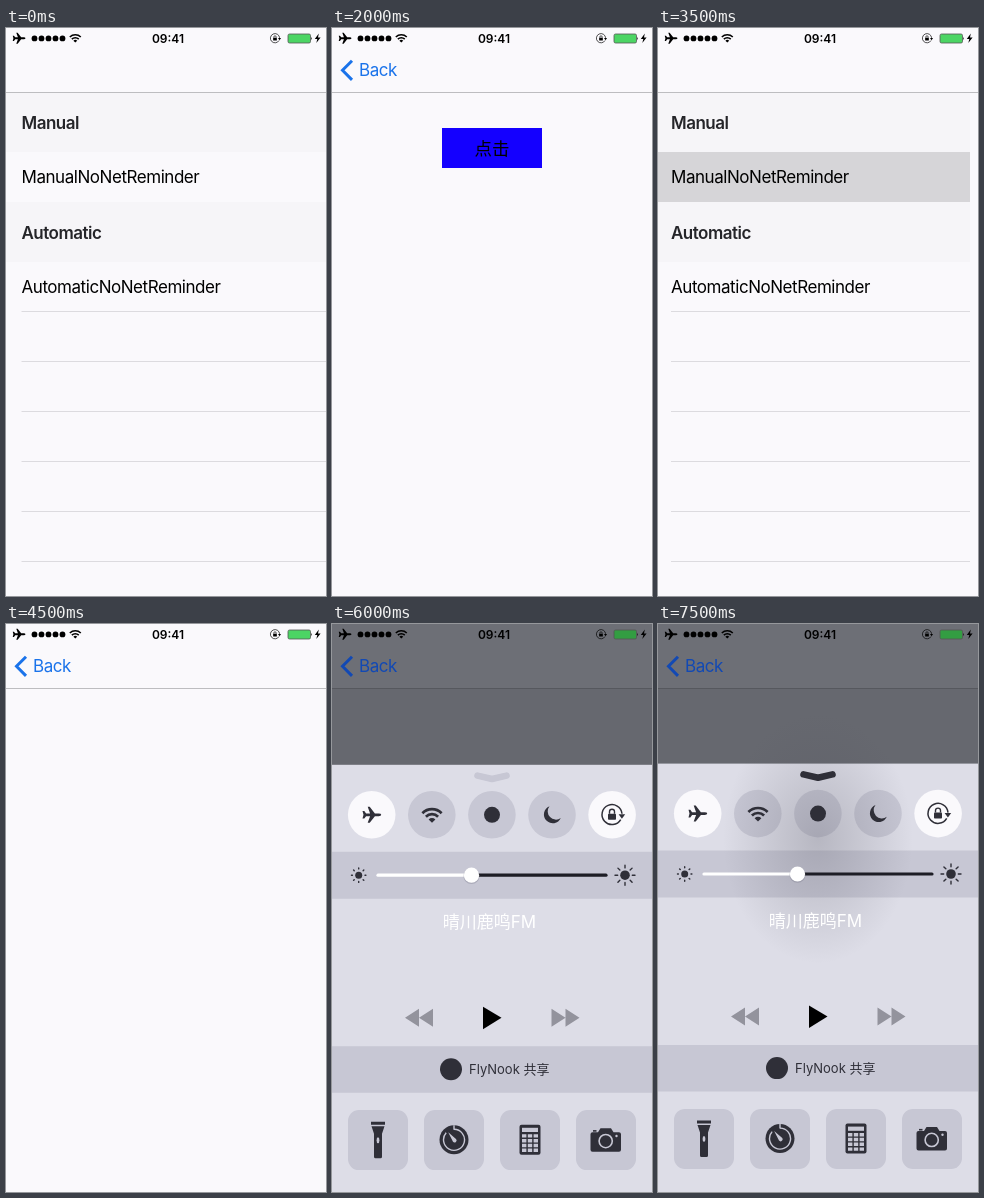
Recreate the animation shown at these times as an HTML page. Size 320x568 px, loop 8000 ms.

```html
<!DOCTYPE html>
<html lang="zh-CN">
<head>
<meta charset="utf-8">
<title>No-network reminder</title>
<style>
html, body { margin: 0; width: 100%; height: 100%; overflow: hidden; background: #faf9fc; }
svg { display: block; width: 320px; height: 568px; font: 17px Inter, "Noto Sans CJK SC", "Noto Sans CJK", sans-serif;
  --page: #faf9fc; --nav: #faf9fc; --blue: #1a73ea; --line: #bdbdc0; --bat: #4cd564; }
svg.soft { --page: #e8e7ea; --nav: #ebebed; --line: #adadb0; --blue: #156be0; --bat: #45c45b; }
svg.dim { --page: #66686f; --nav: #6d6f76; --blue: #1249b4; --line: #56585e; --bat: #339d42; }
.latin { letter-spacing: -.45px; }
.bold { font-weight: 600; fill: #252529; letter-spacing: -.5px; }
.mid { text-anchor: middle; }
.tint { fill: #c7c7d4; }
.ink { fill: #2f2f38; }
.pen { fill: none; stroke: #2f2f38; }
</style>
</head>
<body>
<svg id="stage" viewBox="0 0 320 568">
  <defs>
    <path id="plane" d="M9.5 0Q9.5-1.4 7-1.4H3.2L-2-8H-4L-1.6-1.4H-5.6L-7.4-3.8H-9.2L-8.2 0L-9.2 3.8H-7.4L-5.6 1.4H-1.6L-4 8H-2L3.2 1.4H7Q9.5 1.4 9.5 0Z"/>
    <g id="wifi">
      <path id="wifiArcs" fill="none" stroke="currentColor" stroke-width="2.7"/>
      <path id="wifiDot" fill="currentColor"/>
    </g>
    <path id="wifiOutline" fill="none" stroke="currentColor" stroke-width="4.2" stroke-linejoin="round"/>
    <g id="lock">
      <path d="M8.7 4.8A10 10 0 1 1 10-1" fill="none" stroke="currentColor" stroke-width="1.5"/>
      <path d="M6.6-.6H13.2L9.9 4Z" fill="currentColor"/>
      <rect x="-4" y="-1" width="8" height="6" rx=".8" fill="currentColor"/>
      <path d="M-2.5-1V-3A2.5 2.5 0 0 1 2.5-3V-1" fill="none" stroke="currentColor" stroke-width="1.4"/>
    </g>
    <radialGradient id="blur">
      <stop offset="0" stop-color="#50505c" stop-opacity=".27"/>
      <stop offset=".45" stop-color="#50505c" stop-opacity=".15"/>
      <stop offset="1" stop-color="#50505c" stop-opacity="0"/>
    </radialGradient>
  </defs>

  <rect width="320" height="568" fill="var(--page)"/>
  <rect width="320" height="64" fill="var(--nav)"/>

  <g id="list">
    <g id="rows">
      <path d="M-10 65H330V124H-10ZM-10 174H330V234H-10Z" fill="#f6f5f8"/>
      <rect id="highlight" x="-10" y="124" width="340" height="50" fill="#d6d5d8"/>
      <text class="bold" x="15.5" y="101">Manual</text>
      <text class="latin" x="15.5" y="155">ManualNoNetReminder</text>
      <text class="bold" x="15.5" y="211">Automatic</text>
      <text class="latin" x="15.5" y="265">AutomaticNoNetReminder</text>
      <path id="separators" stroke="#dcdbdf"/>
    </g>
    <rect id="leaving" x="312" y="65" width="8" height="503" fill="#faf9fc"/>
  </g>

  <path d="M0 64.5H320" stroke="var(--line)"/>

  <g id="back" fill="var(--blue)">
    <path d="M20 32.7L10.5 42.3L20 51.9" fill="none" stroke="var(--blue)" stroke-width="3"/>
    <text class="latin" x="27" y="48">Back</text>
  </g>

  <g id="button">
    <rect x="110" y="100" width="100" height="40" fill="#1400ff"/>
    <text class="mid" x="160" y="126.5" font-size="17.5">点击</text>
  </g>

  <g id="hud">
    <rect x="85" y="229" width="150" height="110" rx="10" fill="#000" opacity=".8"/>
    <use href="#wifiOutline" transform="translate(160 294) scale(.55)" color="#fff"/>
    <text class="mid" x="160" y="321" font-size="16" fill="#fff">请检查您的网络</text>
  </g>

  <g id="empty">
    <use href="#wifiOutline" x="159.5" y="255"/>
    <text class="mid" x="160" y="290">请检查您的网络</text>
  </g>

  <g id="status">
    <use href="#plane" transform="translate(13 10.3) scale(.68)"/>
    <g id="dots"></g>
    <use href="#wifi" transform="translate(69.3 10) scale(.57)"/>
    <text class="mid" x="162" y="14.6" font-size="12" font-weight="600">09:41</text>
    <use href="#lock" transform="translate(269 10.3) scale(.46)"/>
    <rect x="282" y="6" width="22.5" height="9" rx="1.5" fill="var(--bat)" stroke="#555" stroke-width=".8"/>
    <path d="M305.3 8.7Q306.8 10.5 305.3 12.3Z"/>
    <path d="M312.8 5.5L308.8 11H311.3L310.3 15L314.6 9.4H312Z"/>
  </g>

  <g id="panel">
    <rect width="320" height="580" fill="#dddde7"/>
    <g id="toggles"></g>
    <path class="tint" d="M0 87H320V134H0ZM0 281.5H320V328H0Z"/>
    <ellipse id="smudge" cx="160" cy="75" rx="95" ry="125" fill="url(#blur)"/>
    <path id="grabber" fill="none" stroke-width="6.6" stroke-linecap="round" stroke-linejoin="round"/>

    <use href="#plane" class="ink" x="39.7" y="50"/>
    <use href="#wifi" x="100" y="50" color="#2f2f38"/>
    <circle class="ink" cx="160" cy="50" r="8"/>
    <path class="ink" d="M217.5 41.5A8.8 8.8 0 1 0 228.8 53.2A8.2 8.2 0 0 1 217.5 41.5Z"/>
    <use href="#lock" x="280" y="50" color="#2f2f38"/>

    <g id="suns"></g>
    <path d="M46 110.4H139" stroke="#fff" stroke-width="3.2" stroke-linecap="round"/>
    <path d="M139 110.4H274" stroke="#1d1d25" stroke-width="3.2" stroke-linecap="round"/>
    <circle cx="139.5" cy="111.2" r="8" fill="#77778a" opacity=".35"/>
    <circle cx="139.5" cy="110.4" r="7.6" fill="#fff"/>

    <text class="mid" x="157.5" y="163" fill="#fff">晴川鹿鸣FM</text>

    <path d="M87 244V262L73 253ZM101 244V262L87 253ZM219.5 244V262L233.5 253ZM233.5 244V262L247.5 253Z" fill="#93939d"/>
    <path d="M151 242L169.5 253L151 264.5Z"/>
    <circle class="ink" cx="119" cy="304.5" r="11"/>
    <text x="137" y="309.3" font-size="13" class="ink">FlyNook 共享</text>

    <g id="tiles" class="tint"></g>
    <g class="ink">
      <path d="M39 357H53V360H39ZM39.5 361.5H52.5L50 369V392Q50 393.5 48.5 393.5H43.5Q42 393.5 42 392V369Z"/>
      <ellipse cx="46" cy="375.5" rx="1.4" ry="3" fill="#c7c7d4"/>
      <circle cx="122" cy="375" r="14.5"/>
      <path d="M122 364.5A10.5 10.5 0 1 1 114.2 368" fill="none" stroke="#c7c7d4" stroke-width="1.4"/>
      <path d="M122 360.5V365" stroke="#c7c7d4" stroke-width="1.4"/>
      <path d="M116.2 367.5L124 374.2A2 2 0 0 1 121 377Z" fill="#c7c7d4"/>
      <rect x="187.5" y="360" width="21" height="30" rx="2"/>
      <rect x="190" y="363" width="16" height="4.2" fill="#c7c7d4"/>
      <path id="keys" fill="#c7c7d4"/>
      <path d="M260.5 367.5H266L268.5 363.5H279L281.5 367.5H287Q289 367.5 289 369.5V385Q289 387 287 387H260.5Q258.5 387 258.5 385V369.5Q258.5 367.5 260.5 367.5Z"/>
      <rect x="261" y="365.3" width="3.5" height="1.6"/>
      <circle cx="273.7" cy="376.3" r="6.6" fill="none" stroke="#c7c7d4" stroke-width="1.6"/>
      <circle cx="284.5" cy="371.2" r="1.2" fill="#c7c7d4"/>
    </g>
  </g>
</svg>
<script>
const $ = id => document.getElementById(id);
const set = (id, attr, value) => $(id).setAttribute(attr, value);
const show = (id, on) => { $(id).style.display = on ? '' : 'none'; };
const repeat = (n, fn) => Array.from({ length: n }, (_, i) => fn(i)).join('');

// Quarter arc of radius r above the apex (0, y)
const arc = (r, y, from = -1) => {
  const d = r * Math.SQRT1_2;
  return `${from * d} ${y - d}A${r} ${r} 0 0 ${from < 0 ? 1 : 0} ${-from * d} ${y - d}`;
};
const band = (outer, inner) => `M${arc(outer, 0)}L${arc(inner, 0, 1)}Z`;

set('wifiArcs', 'd', `M${arc(8.6, 8)}M${arc(13.6, 8)}`);
set('wifiDot', 'd', `M0 8L${arc(4.8, 8)}Z`);
set('wifiOutline', 'd', `${band(82, 67)}${band(54, 40)}M0 0L${arc(26, 0)}Z`);
set('separators', 'd', repeat(6, i => `M15.5 ${283.5 + 50 * i}H330`));
set('keys', 'd', repeat(12, i => `M${190 + 5.8 * (i % 3)} ${369.4 + 4.8 * (i / 3 | 0)}h4.4v3.4h-4.4z`));
$('dots').innerHTML = repeat(5, i => `<circle cx="${28.5 + 7 * i}" cy="10.4" r="2.9"/>`);
$('toggles').innerHTML = repeat(5, i => `<circle cx="${39.7 + 60.1 * i}" cy="50" r="23.8"/>`);
$('tiles').innerHTML = repeat(4, i => `<rect x="${16 + 76 * i}" y="345.3" width="60" height="60" rx="11"/>`);

const sun = (x, core, inner, outer) => `<circle class="ink" cx="${x}" cy="110.4" r="${core}"/>` +
  `<path class="pen" stroke-width="1.4" stroke-linecap="round" d="${repeat(8, i => {
    const c = Math.cos(i * Math.PI / 4), s = Math.sin(i * Math.PI / 4);
    return `M${x + inner * c} ${110.4 + inner * s}L${x + outer * c} ${110.4 + outer * s}`;
  })}"/>`;
$('suns').innerHTML = sun(26.7, 3.5, 6.3, 7.2) + sun(293, 4.8, 7.3, 10);

const FLAT = 'M145.5 12.5H174.5', CHEVRON = 'M145.5 10.8L160 14.2L174.5 10.8';
const list = { list: true }, page = {};
const open = { shade: 'dim', top: 139.6, grip: CHEVRON };

// One scene per half second
const STEP = 500;
const scenes = [
  list, list, list, { list: true, highlight: true },
  { button: true }, { button: true, hud: true }, { button: true },
  { list: true, highlight: true, leaving: true },
  page, page,
  { shade: 'soft', top: 343, grip: FLAT, wifiOn: true },
  { ...open, wifiOn: true },
  { ...open, top: 140.8, pale: true },
  page, { empty: true },
  { ...open, smudge: true }
];

function draw(s) {
  set('stage', 'class', s.shade || '');
  for (const id of ['list', 'highlight', 'leaving', 'button', 'hud', 'empty', 'smudge']) show(id, s[id]);
  show('back', !s.list);
  set('rows', 'transform', `translate(${s.leaving ? -2.5 : 0})`);
  show('panel', s.top);
  if (!s.top) return;
  set('panel', 'transform', `translate(0 ${s.top})`);
  set('grabber', 'd', s.grip);
  set('grabber', 'stroke', s.pale ? '#c7c7d4' : '#2f2f38');
  [...$('toggles').children].forEach((c, i) => {
    const on = i === 0 || i === 4 || (i === 1 && s.wifiOn);
    c.setAttribute('fill', on ? '#faf9fc' : '#c7c7d4');
  });
}

let current = -1;
function tick() {
  const index = Math.floor(performance.now() / STEP) % scenes.length;
  if (index !== current) draw(scenes[current = index]);
  requestAnimationFrame(tick);
}
tick();
</script>
</body>
</html>
```
